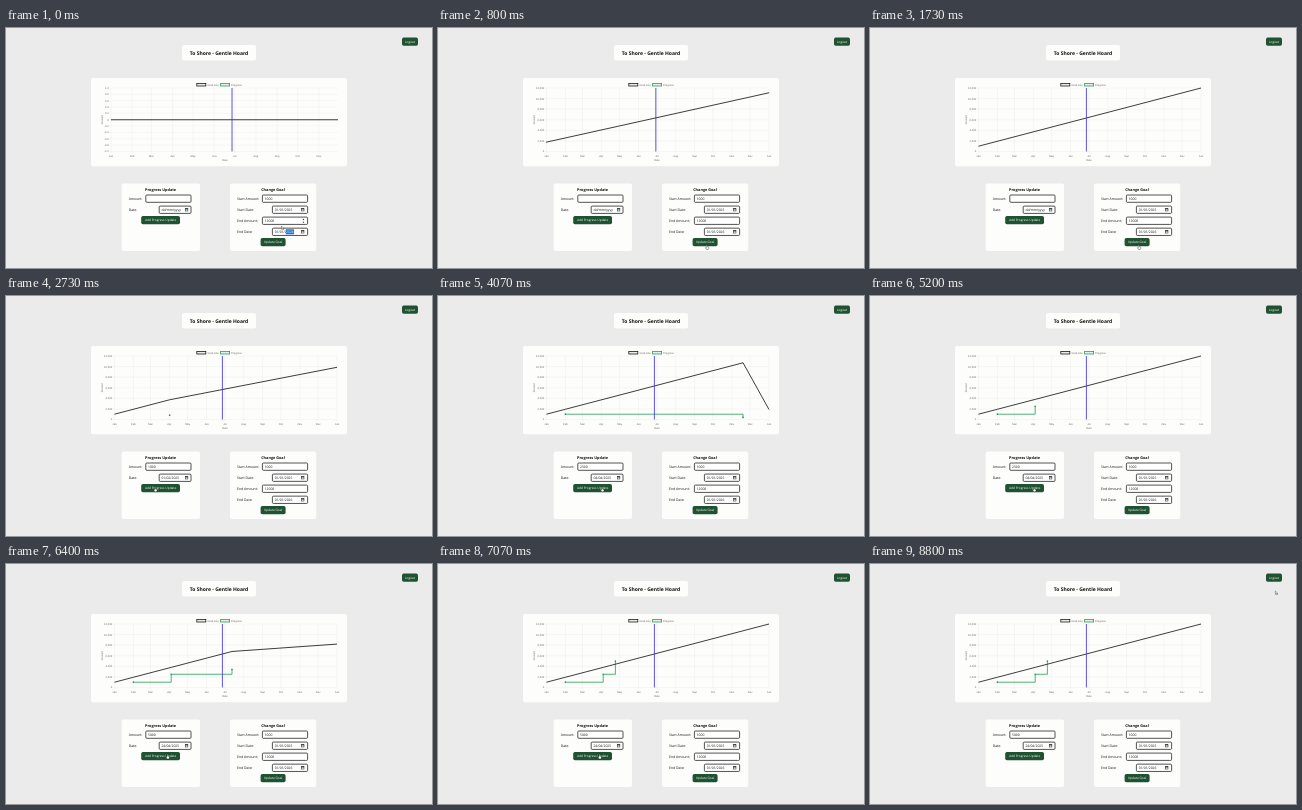
Animation, 426 px wide and 240 px high, one loop 8870 ms. Source, as an HTML page:

```html
<!DOCTYPE html>
<html lang="en">
<head>
<meta charset="utf-8">
<title>Savings goal</title>
<style>
  html, body { margin: 0; width: 100%; height: 100%; overflow: hidden; background: #ebebeb; }
  svg { display: block; width: 100vw; height: 100vh; }
  text { font-family: "Open Sans", "Noto Sans", sans-serif; fill: #111; text-rendering: geometricPrecision; }
  .chart text { font-family: "Liberation Sans", sans-serif; font-size: 2.67px; fill: #666; }
</style>
</head>
<body>
<svg viewBox="0 0 426 240">
  <g id="page"></g>
  <g id="live"></g>
</svg>
<script>
const LOOP = 8870, FPS = 15, ANIMATION = 1000;
const TOP = 60, BOTTOM = 123.5, MIDDLE = (TOP + BOTTOM) / 2;
const GREEN = '#1f5230', PROGRESS = '#25a05a', INK = '#1a1a1a';
const MONTHS = 'Jan Feb Mar Apr May Jun Jul Aug Sep Oct Nov Dec Jan'.split(' ');
const TODAY = 177;

// Each clip opens with a hard cut; its button click updates the chart.
const clips = [
  { cut: 0, click: 422, amount: '', date: 'dd/mm/yyyy' },
  { cut: 1930, click: 2383, amount: '1000', date: '01/02/2025', day: 31 },
  { cut: 3600, click: 4025, amount: '2500', date: '04/04/2025', day: 93 },
  { cut: 5730, click: 6150, amount: '5000', date: '24/04/2025', day: 113 },
];
const cursorPath = [
  [0, 275.5, 198], [270, 275.5, 198], [400, 268.3, 217.3], [1929, 268.3, 217.3],
  [1930, 148.6, 191.6], [3599, 148.6, 191.6], [3600, 163.5, 191.6],
  [5729, 163.5, 191.6], [5730, 161, 190.8], [8270, 161, 190.8], [8800, 405.4, 27], [LOOP, 405.4, 27],
];

const mix = (a, b, p) => a + (b - a) * p;
const easeOutQuart = p => 1 - (1 - p) ** 4;
const smooth = p => p * p * (3 - 2 * p);

const rect = (x, y, w, h, fill, extra = '') =>
  `<rect x="${x}" y="${y}" width="${w}" height="${h}" fill="${fill}" ${extra}/>`;
const label = (x, y, size, string, extra = '') =>
  `<text x="${x}" y="${y}" font-size="${size}" ${extra}>${string}</text>`;
const centered = 'text-anchor="middle"';
const line = (x1, y1, x2, y2, color, width) =>
  `<path d="M${x1} ${y1}L${x2} ${y2}" stroke="${color}" stroke-width="${width}"/>`;
const card = (x, y, w, h) => rect(x, y, w, h, '#fdfdfb', 'rx="2"');
const heading = (x, y, size, string) => label(x, y, size, string, `${centered} font-weight="700"`);
const button = (x, y, w, h, string) => rect(x, y, w, h, GREEN, 'rx="1.8"') +
  label(x + w / 2, y + h / 2 + 1.1, 3.2, string, `${centered} style="fill:#fff"`);
const field = (x, y, w) => rect(x, y, w, 7.3, '#fff', `rx="1" stroke="${INK}" stroke-width=".75"`);
const value = (x, y, string) => label(x, y, 3.35, string);
const calendar = (x, y) => rect(x, y, 2.6, 2.5, 'none', `stroke="${INK}" stroke-width=".5"`) +
  rect(x, y, 2.6, .9, INK);

function drawPage() {
  const rows = ['Start Amount:', 'Start Date:', 'End Amount:', 'End Date:'];
  const values = ['1000', '01/01/2025', '12000', '01/01/2026'];
  return card(176, 17, 74, 15.6) + heading(213, 26.8, 5, 'To Shore - Gentle Hoard') +
    button(396, 9.6, 16, 8.2, 'Logout') +
    card(85, 50, 256, 88.2) +
    card(115.7, 155.4, 78.3, 67.6) + heading(154.6, 163.4, 3.8, 'Progress Update') +
    label(122.7, 172, 3.45, 'Amount:') + field(139.8, 167, 45.2) +
    label(122.7, 183, 3.45, 'Date:') + field(153.2, 178.1, 31.8) + calendar(179.3, 180.5) +
    button(135.2, 188, 38.8, 8.2, 'Add Progress Update') +
    card(224, 155.4, 86.2, 67.6) + heading(267, 163.4, 3.8, 'Change Goal') +
    rows.map((name, i) => {
      const y = 167 + i * 11.05, isDate = i % 2, x = isDate ? 266.4 : 256.4;
      return label(231, y + 5, 3.45, name) + field(x, y, 301.6 - x) +
        value(x + 2.3, y + 4.9, values[i]) + (isDate ? calendar(295.4, y + 2.4) : '');
    }).join('') +
    button(254.6, 210, 25, 8.3, 'Update Goal');
}

const emptyAxes = { left: 105, right: 332, days: 332, ticks: 10, tick: i => i === 5 ? '0' : (1 - i * .2).toFixed(1) };
const goalAxes = { left: 108.5, right: 331, days: 365, ticks: 6, tick: i => (12000 - i * 2000).toLocaleString('en-US') };
const dayX = (axes, day) => mix(axes.left, axes.right, day / axes.days);
const amountY = amount => mix(BOTTOM, TOP, amount / 12000);

function drawAxes(axes) {
  let out = '';
  for (let i = 0; i <= axes.ticks; i++) {
    const y = mix(TOP, BOTTOM, i / axes.ticks);
    out += line(axes.left - 1.8, y, axes.right, y, '#e8e8e7', .35) +
      label(axes.left - 2.3, y + .95, 2.67, axes.tick(i), 'text-anchor="end"');
  }
  MONTHS.forEach((month, i) => {
    const day = (Date.UTC(2025, i, 1) - Date.UTC(2025, 0, 1)) / 864e5;
    if (day > axes.days) return;
    const x = dayX(axes, day);
    out += line(x, TOP, x, BOTTOM + 1.8, '#e8e8e7', .35) + label(x, 128.5, 2.67, month, centered);
  });
  const swatch = (x, color) => rect(x, 55.5, 9, 2.5, '#ececea', `stroke="${color}" stroke-width=".8"`);
  return out + swatch(190.8, INK) + label(201.4, 57.7, 2.67, 'Goal Line') +
    swatch(214.6, PROGRESS) + label(225.2, 57.7, 2.67, 'Progress') +
    label(219, 133.3, 2.67, 'Date', centered) +
    label(0, 0, 2.67, 'Amount', `${centered} transform="translate(96.5 ${MIDDLE}) rotate(-90)"`);
}

const goalStart = [goalAxes.left, amountY(1000)], goalEnd = [goalAxes.right, TOP];
const corner = [goalAxes.right, BOTTOM];
const updatesUpTo = n => clips.slice(1, n + 1).map(c => [dayX(goalAxes, c.day), amountY(+c.amount)]);
const goalAfter = n => n < 0
  ? [[emptyAxes.left, MIDDLE], [emptyAxes.right, MIDDLE]]
  : [goalStart, ...updatesUpTo(n).map(([x]) =>
      [x, mix(goalStart[1], TOP, (x - goalAxes.left) / (goalAxes.right - goalAxes.left))]), goalEnd];
// Points new to the chart rise from the lower right corner.
const blend = (from, to, p) => to.map((point, i) =>
  point.map((v, k) => mix((from[i] || corner)[k], v, p)));

function drawChart(t) {
  const n = clips.filter(c => t >= c.click).length - 1;
  const p = n < 0 ? 1 : easeOutQuart(Math.min(1, (t - clips[n].click) / ANIMATION));
  const axes = n < 0 ? emptyAxes : goalAxes;
  const goal = blend(goalAfter(n - 1), goalAfter(n), p);
  const progress = blend(updatesUpTo(n - 1), updatesUpTo(n), p);
  const todayX = n === 0 ? mix(dayX(emptyAxes, TODAY), dayX(goalAxes, TODAY), p) : dayX(axes, TODAY);
  const steps = progress.map(([x, y], i) => i ? `H${x}V${y}` : `M${x} ${y}`).join('');
  return `<g class="chart">${drawAxes(axes)}</g>` +
    `<path d="${steps}" fill="none" stroke="${PROGRESS}" stroke-width=".8"/>` +
    progress.map(([x, y]) => `<circle cx="${x}" cy="${y}" r=".85" fill="${PROGRESS}"/>`).join('') +
    `<path d="M${goal.join('L')}" fill="none" stroke="${INK}" stroke-width=".85"/>` +
    line(todayX, TOP, todayX, BOTTOM, '#4036d6', .85);
}

function drawForm(t) {
  const { amount, date } = clips.filter(c => t >= c.cut).pop();
  let out = value(142, 171.9, amount) + value(155.4, 183, date);
  if (t < clips[0].click) {
    out += rect(279.8, 201.3, 8.2, 5, '#1a78d6') + label(280.1, 205.05, 3.35, '2026', 'style="fill:#fff"');
  }
  if (t < 330) out += `<path d="M296.5 192l.9-1.2.9 1.2zM296.5 193.8l.9 1.2.9-1.2z" fill="${INK}"/>`;
  return out;
}

function drawCursor(t) {
  const i = cursorPath.findIndex(([time]) => time > t);
  const [t0, x0, y0] = cursorPath[i - 1], [t1, x1, y1] = cursorPath[i];
  const p = smooth((t - t0) / (t1 - t0));
  const overButton = t > 330 && t < 8300;
  const shape = overButton
    ? 'M0 0q.5-.5.8 0v1.3l1.6.5q.3 1.4-.5 2.4h-1.6l-1.2-1.6q.2-.6.9-.1z'
    : 'M0 0v3.3l.8-.7.6 1.3.6-.3-.6-1.2h1z';
  return `<path d="${shape}" transform="translate(${mix(x0, x1, p)} ${mix(y0, y1, p)})"
    fill="#fff" stroke="#111" stroke-width=".35"/>`;
}

const live = document.getElementById('live');
let shown = -1;
function tick() {
  const frame = Math.floor(performance.now() % LOOP * FPS / 1000 + .1);
  if (frame !== shown) {
    shown = frame;
    const t = Math.min(frame * 1000 / FPS, LOOP - 1);
    live.innerHTML = drawChart(t) + drawForm(t) + drawCursor(t);
  }
  requestAnimationFrame(tick);
}
document.getElementById('page').innerHTML = drawPage();
tick();
</script>
</body>
</html>
```
